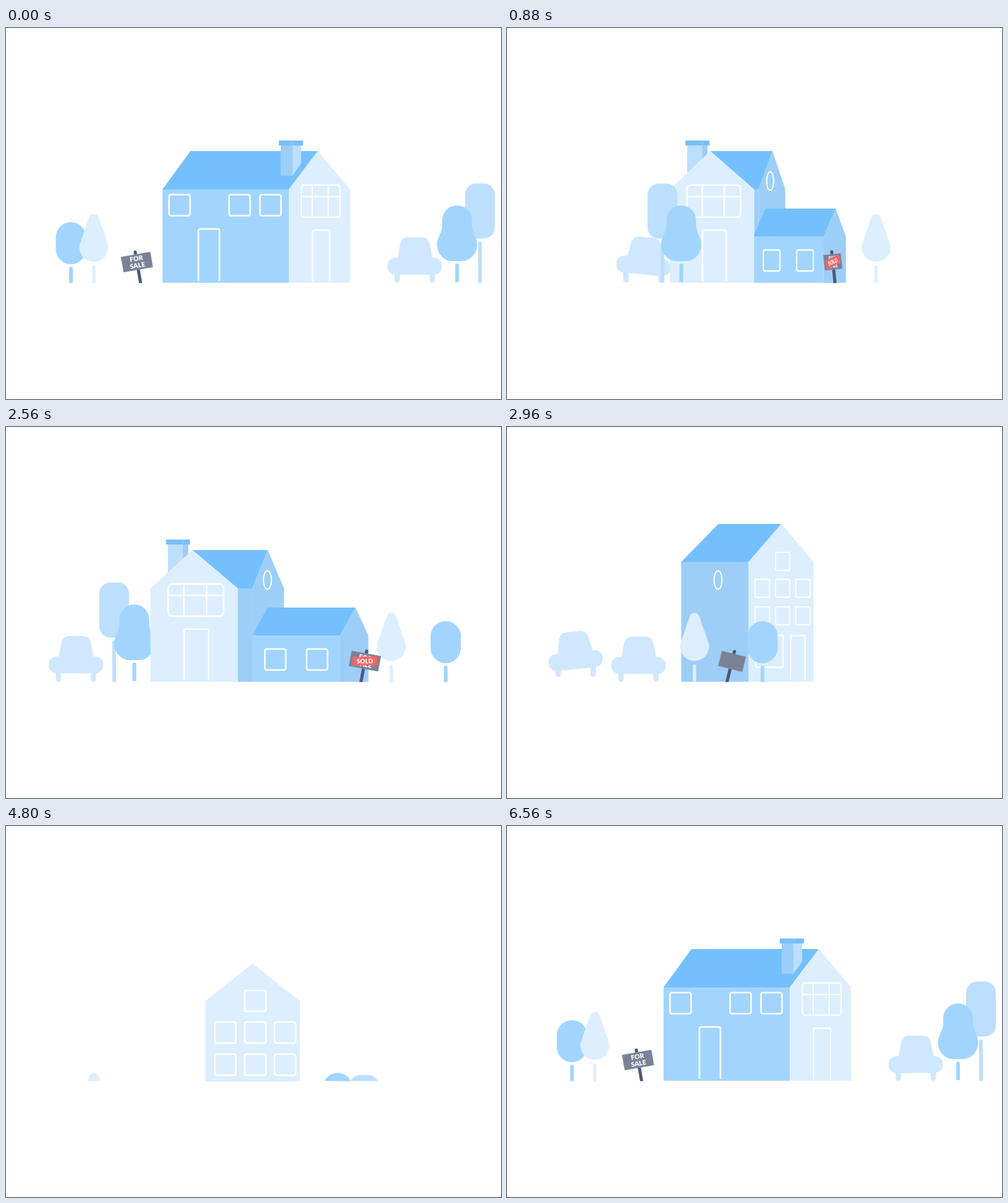
Animation, 800 px wide and 600 px high, one loop 6.6 s. Source, as an HTML page with a canvas:

```html
<!DOCTYPE html>
<html lang="en">
<head>
<meta charset="utf-8">
<title>House for sale</title>
<style>
html, body { margin: 0; width: 100%; height: 100%; overflow: hidden; background: #fff; }
canvas { display: block; }
</style>
</head>
<body>
<canvas id="stage" width="800" height="600"></canvas>
<script>
const ctx = document.getElementById('stage').getContext('2d');
const LOOP = 6600, GROUND = 412, RESET = 4960;
const ROOF = '#74c0ff', WALL = '#a1d5ff', GABLE = '#9dcef8', PALE = '#ddefff', MIST = '#bcdffd', CAR = '#cfe8ff';
let t = 0;

const clamp = v => Math.max(0, Math.min(1, v));
const lerp = (a, b, f) => a + (b - a) * f;
const span = (start, length) => clamp((t - start) / length);
const turn = start => {
  const u = span(start, 960);
  return u < .5 ? 8 * u ** 4 : 1 - 8 * (1 - u) ** 4;
};
const place = (a, b, c, s1, s2) =>
  t > RESET ? a : t < 2040 ? lerp(a, b, turn(s1)) : lerp(b, c, turn(s2));

// Distance below the ground: sinking before the reset, rising after it
const depth = (sinkAt, riseAt, dist = 230, length = 1050) =>
  t < RESET ? 288 * span(sinkAt, 501) ** 3 : dist * (1 - span(riseAt, length)) ** 3;

function poly(color, ...pts) {
  ctx.fillStyle = color;
  ctx.beginPath();
  for (let i = 0; i < pts.length; i += 2) ctx.lineTo(pts[i], pts[i + 1]);
  ctx.closePath();
  ctx.fill();
}
function box(color, x, y, w, h, r = 0) {
  ctx.fillStyle = color;
  ctx.beginPath();
  ctx.roundRect(x, y, w, h, r);
  ctx.fill();
}
function blob(color, d) {
  ctx.fillStyle = color;
  ctx.fill(new Path2D(d));
}
function at(x, y, draw) {
  ctx.save();
  ctx.translate(x, y);
  draw();
  ctx.restore();
}
function outline(d) {
  ctx.strokeStyle = '#fff';
  ctx.lineWidth = 2.6;
  ctx.stroke(new Path2D(d));
}
function pane(x, y, w, h, r = 3) {
  ctx.strokeStyle = '#fff';
  ctx.lineWidth = 2.6;
  ctx.beginPath();
  ctx.roundRect(x, y, w, h, r);
  ctx.stroke();
}
const door = (x, y, w, bottom) =>
  outline(`M${x} ${bottom}V${y + 3}q0-3 3-3H${x + w - 3}q3 0 3 3V${bottom}`);

// A wall's details, squeezed with the wall as it turns
function squeeze(x, sx, draw, sy = 1) {
  ctx.save();
  ctx.translate(x, GROUND);
  ctx.scale(sx, sy);
  ctx.translate(0, -GROUND);
  draw();
  ctx.restore();
}

function gableWall(color, l, apex, r, eave, top) {
  poly(color, l, eave, apex, top, r, eave, r, GROUND, l, GROUND);
}

function frontDetails() {
  pane(29, 254, 90, 52, 6);
  outline('M54.5 254V306M91.5 254V306M29 272.5H119');
  door(55, 327, 40, 410);
}

function extension(x, size) {
  if (size <= 0) return;
  squeeze(x, size, () => {
    poly(GABLE, 143, 337, 168, 292, 189, 337, 189, GROUND, 143, GROUND);
    box(WALL, 0, 337, 143, 75);
    poly(ROOF, 25, 292, 168, 292, 143, 337, 0, 337);
    pane(20.5, 359, 34, 34);
    pane(88.5, 359, 34, 34);
  });
}

function chimney(x, f) {
  const a = x + 3 + Math.max(0, 19 - 43 * f), end = x + 36, b = Math.min(end, a + 24);
  box(GABLE, x + 3, 189, a - x - 3, 50);
  poly('#bcdffc', a, 189, b, 189, b, 219, a, 239);
  if (b < end) box(GABLE, b, 189, end - b, 30);
  box('#78bffa', x, 182, 39, 8);
  box('rgba(255,255,255,.25)', f < .6 ? a : b, 182, .8, 8);
}

function oval(x, rx) {
  ctx.strokeStyle = '#fff';
  ctx.lineWidth = 2;
  ctx.beginPath();
  ctx.ellipse(x, 247.5, rx, 15, 0, 0, 7);
  ctx.stroke();
}

function firstTurn() {
  const f = t > RESET ? 0 : turn(267);
  const e = t > RESET ? (1 - span(5000, 1050)) ** 2 : 0;
  const l = lerp(457, 233, f) + 33 * e, r = lerp(556, 375, f) - 38 * e, apex = lerp(504, 301, f);
  const left = 253 + 150 * f + 11 * e, topLeft = 298 + 179 * f - 16 * e;
  if (left < l) {
    box(WALL, left, 260, l - left, 152);
    poly(ROOF, left, 261, topLeft, 199, apex, 199, l, 261);
    squeeze(left, (l - left) / 204, () => {
      for (const x of [10.5, 107.5, 157.5]) pane(x, 269.5, 34, 34);
      door(58, 325, 34, 409);
    });
  }
  chimney(place(441, 258, 258, 285, 0) + 16 * e, f);
  if (f > .25) {
    const tr = lerp(468, 423, f), near = lerp(460, 398, f), far = lerp(455, 449, f);
    if (r < near) box(GABLE, r, 260, near - r, 152);
    gableWall(GABLE, near, tr, far, 261, 199);
    poly(ROOF, apex, 199, tr, 199, near, 261, r, 261);
    if (f > .5) oval(lerp(440, 423, f), 6.5 * f);
    extension(398, clamp((f - .35) / .65));
  }
  gableWall(PALE, l, apex, r, 261, 199);
  squeeze(l, (r - l) / 142, frontDetails);
}

function secondTurn() {
  const f = turn(2415), p = turn(2465), mid = .72;
  const key = (a, b, c) => f < mid ? lerp(a, b, f / mid) : lerp(b, c, (f - mid) / (1 - mid));
  const eave = 261 - 76 * p, top = 199 - 75 * p;
  const c = key(375, 281, 322), d = key(398, 391, 322), r = key(449, 495, 475);
  const topLeft = key(301, 341, 398.5), topRight = key(423, 444, 398.5);
  const oldLeft = key(233, 281, 322), tint = clamp((f - .15) / .25);

  if (f < mid) chimney(lerp(258, 350, f / mid), 1);
  if (d > c) {
    box(GABLE, c, eave - 1, d - c, GROUND - eave + 1);
    poly(ROOF, topLeft, top, topRight, top, d, eave, c, eave);
  }
  gableWall(GABLE, d, topRight, r, eave, top);
  if (tint > 0) {
    ctx.save();
    ctx.globalAlpha = tint;
    gableWall(PALE, d, topRight, r, eave, top);
    squeeze(d, (r - d) / 153, () => {
      pane(64, 167, 34, 34);
      for (const y of [218, 270]) for (const x of [15.5, 64, 112]) pane(x, y, 34, 34);
      pane(17, 324.5, 65, 60);
      door(100, 324.5, 34, 409);
    }, (GROUND - eave) / 227);
    ctx.restore();
  }
  if (d - c > 20) oval(key(423, 341, 345), key(6.5, 6.5, 0));
  extension(d, 1 - clamp(f / .6));
  if (c > oldLeft) {
    gableWall(PALE, oldLeft, topLeft, c, eave, top);
    squeeze(oldLeft, (c - oldLeft) / 142, frontDetails);
  }
}

function roundTree() {
  at(place(105, 713, 315, 349, 2403), depth(4450, 5127), () => {
    box(WALL, -24.5, 314, 49, 68, 24.5);
    box(WALL, -3, 386, 6, 27, [3, 3, 0, 0]);
  });
}
function coneTree() {
  at(place(142, 624, 142, 200, 2435), depth(4450, 5100), () => {
    blob(PALE, 'M-7.5 306A8 8 0 0 1 7.5 306L21.5 346A23.3 23.3 0 1 1-21.5 346Z');
    box(PALE, -2.7, 384, 5.4, 29, [2.7, 2.7, 0, 0]);
  });
}
function pearTree() {
  at(place(729, 206, 536, 273, 2415), depth(4435, 5100), () => {
    blob(WALL, 'M-24 311A24 24 0 0 1 24 311V318C24 332 32.5 338 32.5 350C32.5 366 20 377 8 377H-8' +
      'C-20 377-32.5 366-32.5 350C-32.5 338-24 332-24 318Z');
    box(WALL, -3, 381, 6, 30, [3, 3, 0, 0]);
  });
}
function tallTree() {
  at(place(766, 173, 579, 265, 2415), depth(4397, 5127), () => {
    box(MIST, -24, 251.5, 48, 89, 18);
    box(MIST, -3, 345.5, 6, 67, [3, 3, 0, 0]);
  });
}

function car(x, y, tilt) {
  at(x, y, () => {
    for (const leg of [-32.5, 24]) box(CAR, leg, 390, 8.6, 22, 4.3);
    ctx.translate(0, 385 + .5 * Math.sin(t * Math.PI / 120));
    ctx.rotate(tilt * Math.PI / 180);
    ctx.translate(0, -385);
    box(CAR, -44, 371.5, 88, 27.5, 13);
    blob(CAR, 'M-31 380Q-28.5 377-28 373L-23.5 350Q-21.5 338.5-11 338.5H12Q22 338.5 24.5 350L29 373Q29.5 377 32 380Z');
  });
}
const carDepth = () => t < RESET ? 90 * span(4250, 350) ** 2 : 90 * (1 - span(5650, 500)) ** 3;
function firstCar() {
  const f = t > RESET ? 0 : turn(301);
  const hop = Math.sin(Math.PI * span(2820, 300));
  car(lerp(660.5, 113, f) - 2 * hop, carDepth() - 8 * hop, 9.6 * Math.sin(Math.PI * f) - 6 * hop);
}
function secondCar() {
  if (t > 2500 && t < RESET) car(lerp(340, 212.5, 1 - (1 - span(2550, 390)) ** 3), carDepth(), 0);
}

function sign() {
  let lean, spin = 0, y = 0;
  if (t > RESET) {
    const s = t - 5600;
    lean = -10 + 35 * (s < 0 ? 1 : Math.cos(s * Math.PI / 250) * Math.exp(-s / 200));
    y = 100 * (1 - span(5400, 400)) ** 3;
  } else {
    const early = t < 2040, f = turn(early ? 264 : 2372), rest = early ? 1320 : 3400;
    lean = lerp(-10, 10, early ? f ** 8 : 1 - f ** 8) + (early ? -6.5 : 15) * Math.sin(Math.PI * f);
    if (t > rest) lean += 3 * Math.sin((t - rest) * Math.PI / 200) * Math.exp((rest - t) / 220);
    spin = 2 * Math.PI * f ** (early ? 1.17 : 2.66);
    y = 100 * span(4200, 350) ** 2;
  }
  const face = Math.cos(spin);
  const sold = t < RESET && (t > 1320 || spin > Math.PI);
  const label = (text, ty, size) => {
    ctx.font = `900 ${size}px Lato, "Open Sans", sans-serif`;
    ctx.fillText(text, 0, ty);
  };
  at(place(217.5, 577, 307.5, 264, 2372), GROUND + y, () => {
    ctx.rotate(lean * Math.PI / 180);
    box('#4c5878', -2.5, -53, 5, 56, [2.5, 2.5, 0, 0]);
    ctx.translate(0, -34);
    ctx.scale(Math.max(.13, Math.abs(face)), 1);
    box('#7b8197', -23.8, -12.3, 47.6, 24.6);
    ctx.strokeStyle = '#8b90a3';
    ctx.lineWidth = .8;
    ctx.strokeRect(-23.8, -12.3, 47.6, 24.6);
    if (face < .2) return;
    ctx.textAlign = 'center';
    ctx.textBaseline = 'middle';
    ctx.fillStyle = '#fff';
    label('FOR', -5, 10.5);
    label('SALE', 6, 10.5);
    if (!sold) return;
    ctx.rotate(-.21);
    box('#ff6366', -20, -7, 40, 14);
    ctx.fillStyle = '#fff';
    label('SOLD', .6, 10);
  });
}

function draw() {
  ctx.clearRect(0, 0, 800, 600);
  ctx.save();
  ctx.beginPath();
  ctx.rect(0, 0, 800, GROUND + .4);
  ctx.clip();
  const leftTrees = [roundTree, coneTree], rightTrees = [tallTree, pearTree];
  const swapped = t > 2400 && t < RESET;
  secondCar();
  for (const tree of swapped ? rightTrees : leftTrees) tree();
  at(0, depth(4450, 5000), t > 2040 && t < RESET ? secondTurn : firstTurn);
  firstCar();
  for (const tree of swapped ? leftTrees : rightTrees) tree();
  sign();
  ctx.restore();
}

const begin = performance.now();
function frame() {
  t = (performance.now() - begin) % LOOP;
  draw();
  requestAnimationFrame(frame);
}
frame();
</script>
</body>
</html>
```
